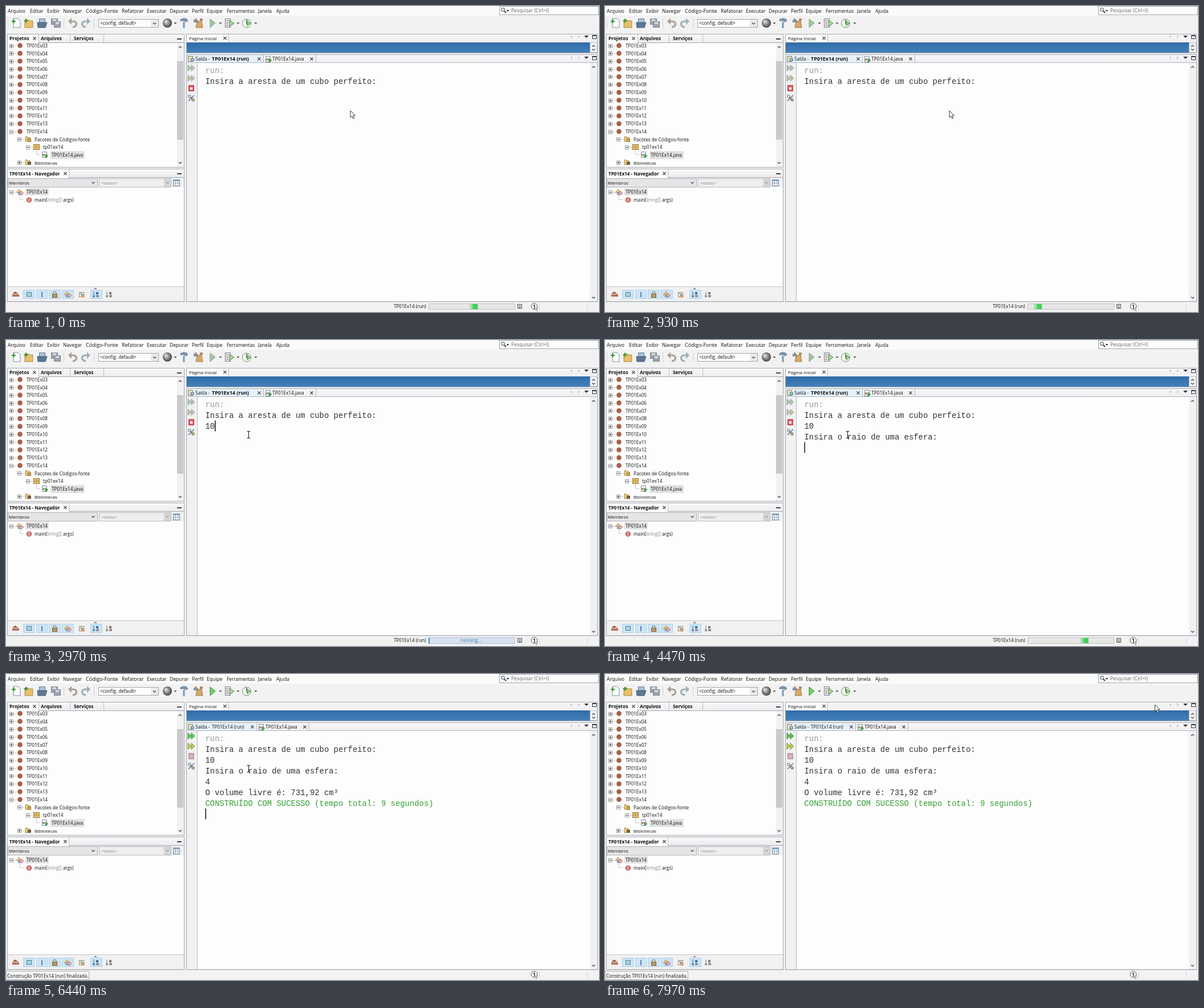
These frames come from a looping animation (1040x538 px, 8100 ms). An HTML page with a canvas:

```html
<!DOCTYPE html>
<html lang="pt">
<head>
<meta charset="utf-8">
<title>Console run</title>
<style>
html, body { margin: 0; width: 100%; height: 100%; overflow: hidden; background: #f2f2f3 }
canvas { display: block }
</style>
</head>
<body>
<canvas id="stage" width="1040" height="538"></canvas>
<script>
const ctx = document.getElementById('stage').getContext('2d');
const LOOP = 8100, DONE = 5430;
const SANS = '"Open Sans", "Noto Sans", sans-serif', MONO = '"Liberation Mono", monospace';
const EDGE = '#a3a8b2', INK = '#111', WHITE = '#fdfdfd', GREY = '#f1f1f2', BACK = '#f2f2f3';

function rect(x, y, w, h, fill, line) {
  if (fill) { ctx.fillStyle = fill; ctx.fillRect(x, y, w, h); }
  if (line) { ctx.strokeStyle = line; ctx.lineWidth = 1; ctx.strokeRect(x + .5, y + .5, w - 1, h - 1); }
}
function shape(d, fill, line, width = 1, x = 0, y = 0) {
  const p = new Path2D(d);
  ctx.save();
  ctx.translate(x, y);
  if (fill) { ctx.fillStyle = fill; ctx.fill(p); }
  if (line) { ctx.strokeStyle = line; ctx.lineWidth = width; ctx.stroke(p); }
  ctx.restore();
}
function disc(x, y, r, fill, line) {
  ctx.beginPath();
  ctx.arc(x, y, r, 0, 7);
  if (fill) { ctx.fillStyle = fill; ctx.fill(); }
  if (line) { ctx.strokeStyle = line; ctx.lineWidth = 1; ctx.stroke(); }
}
function text(s, x, y, size = 8.2, color = INK, bold = '', family = SANS) {
  ctx.font = `${bold} ${size}px ${family}`;
  ctx.fillStyle = color;
  ctx.fillText(s, x, y);
}
function shade(x, y, w, h, top, bottom, line) {
  const g = ctx.createLinearGradient(0, y, 0, y + h);
  g.addColorStop(0, top);
  g.addColorStop(1, bottom);
  rect(x, y, w, h, g, line);
}
const cross = (x, y) => shape('M-2.6 -2.6L2.6 2.6M2.6 -2.6L-2.6 2.6', null, '#333', 1.2, x, y);
const drop = (x, y, c = '#555') => shape('M-2.5 -1H2.5L0 2Z', c, null, 1, x, y);
const chevron = (x, y, up, c = '#444') =>
  shape(up ? 'M-2.5 1.5L0 -1L2.5 1.5' : 'M-2.5 -1.5L0 1L2.5 -1.5', null, c, 1.2, x, y);
const plus = (x, y) => shape('M-3.5 0H3.5M0 -3.5V3.5', null, '#3a9a3a', 2.2, x, y);

function folder(x, y, w, h, color) {
  shape(`M0 2V${h}H${w}V2H${w / 2}L${w / 2 - 2} 0H1Z`, color, '#92763a', .8, x, y);
}
function expander(x, y, open) {
  rect(x - 3, y - 3, 7, 7, WHITE, '#999');
  shape(open ? 'M-1.5 .5H2.5' : 'M-1.5 .5H2.5M.5 -1.5V2.5', null, '#333', 1, x, y);
  rect(x + 5, y, 4, 1, '#c8c8c8');
}
function javaFile(x, y) {
  rect(x, y - 5, 9, 11, '#f5f7fa', '#8792a5');
  disc(x + 3, y + 1, 2, '#b98072');
  shape('M6 -1L11 2.5L6 6Z', '#46ad46', '#267a2b', .6, x, y);
}
function members(x, y) {
  shape('M-6 1L-1 -5L3 0Z', '#f0c878', '#a37a42', .7, x, y);
  rect(x - 3, y, 6, 5, '#9cc0e4', '#5a82aa');
  shape('M3 -2L7 2L3 6L0 2Z', '#eba9a4', '#b46a66', .7, x, y);
}
function windowControls(y) {
  shape('M993 -3L989 0L993 3Z', '#d0d0d0', null, 1, 0, y);
  shape('M1003 -3L1007 0L1003 3Z', '#d0d0d0', null, 1, 0, y);
  shape('M1014 -2H1022L1018 2Z', '#333', null, 1, 0, y);
  rect(1028, y - 3, 8, 7, WHITE, '#333');
  rect(1028, y - 3, 8, 2, '#333');
}

function menuBar() {
  rect(0, 0, 1040, 17, '#fbfbfb');
  [['Arquivo', 3], ['Editar', 42], ['Exibir', 72], ['Navegar', 100], ['Código-Fonte', 140, 9.1],
   ['Refatorar', 203, 8.8], ['Executar', 247], ['Depurar', 287], ['Perfil', 326], ['Equipe', 352],
   ['Ferramentas', 387, 8.3], ['Janela', 442], ['Ajuda', 474]]
    .forEach(([s, x, size = 8.6]) => text(s, x, 12, size));
  rect(865, 0, 175, 16, WHITE, '#9a9fa8');
  shape('M874 9L877 12', null, '#333', 1.8);
  disc(871.5, 6.5, 3, '#dcebf5', '#444');
  drop(880, 8, '#333');
  text('Pesquisar (Ctrl+I)', 886, 11, 8.4, '#666');
}

function toolbar(done) {
  for (let y = 22; y < 40; y += 3) rect(3, y, 1, 1, '#aaa');
  shape('M13 22H21L25 26V38H13Z', WHITE, '#7d8da5');
  plus(13.5, 27);
  folder(33, 24, 14, 14, '#e9bf68');
  plus(35, 26);
  rect(58, 22, 11, 9, '#a9c4dd', '#657b94');
  shape('M55 29H72L69 38H56Z', '#5d7892', '#475c72');
  [[79, 22], [84, 27]].forEach(([x, y]) => {
    rect(x, y, 12, 11, '#9aa2ad', '#7f8792');
    rect(x + 3, y + 1, 6, 4, '#d5d8dd');
  });
  rect(101, 22, 1, 17, '#d0d0d3');
  shape('M112 27H118C126 27 125 37 117 37', null, '#aaa096', 3.2);
  shape('M109 27L115 21V33Z', '#aaa096');
  shape('M145 27H139C131 27 132 37 140 37', null, '#9fb0b6', 3.2);
  shape('M148 27L142 21V33Z', '#9fb0b6');
  rect(154, 22, 1, 17, '#d0d0d3');

  rect(162, 23, 106, 15, WHITE, '#a6a6ac');
  rect(254, 24, 13, 13, '#eaeaec');
  chevron(260.5, 31);
  text('<config. default>', 165, 33, 8.2);
  const ball = ctx.createRadialGradient(280, 27, 1, 283, 30, 9);
  ball.addColorStop(0, '#ddd');
  ball.addColorStop(.5, '#888');
  ball.addColorStop(1, '#333');
  disc(283, 30, 8, ball);
  [297, 376, 407, 438].forEach(x => drop(x, 30));

  shape('M312 28V39', null, '#7399bb', 3);
  shape('M306 24Q311 20 317 23L319 26L315 28L312 26H306Z', '#7f98af', '#566f88', .8);
  shape('M332 22L338 29', null, '#a97a40', 2);
  shape('M335 28L343 26L345 38H333Z', '#d6a866', '#8e6738', .8);
  rect(329, 24, 6, 5, '#7d98b6');
  rect(340, 22, 5, 4, '#b28c61');
  shape('M358 23L367 30L358 38Z', done ? '#72d45f' : '#a2c59e', done ? '#36863a' : '#82a681');
  rect(384, 22, 10, 16, '#ebeef4', '#778293');
  for (let y = 25; y < 36; y += 3) rect(386, y, 4, 1, '#b55');
  shape('M392 25L400 30.5L392 36Z', '#a9d89c', '#438346');
  disc(422, 30.5, 7.5, '#f3f6ee', '#5d9a5f');
  shape('M422 24V31L425 33', null, '#444', 1.2);
  shape('M423 26L429 30.5L423 35Z', '#8ed07f', '#397c3b', .8);
}

function projects() {
  rect(2, 49, 311, 235, GREY, EDGE);
  shade(3, 50, 309, 14, '#f8f8f9', '#ececee');
  rect(3, 50, 54, 15, WHITE);
  [57, 112, 171].forEach(x => rect(x, 50, 1, 14, '#bdbfc5'));
  rect(57, 64, 255, 1, EDGE);
  text('Projetos', 6, 60, 8.4, INK, 'bold');
  cross(50, 57);
  text('Arquivos', 61, 60, 8.4, INK, 'bold');
  text('Serviços', 119, 60, 8.4, INK, 'bold');
  rect(300, 57, 8, 2, '#444');

  rect(3, 65, 297, 218, WHITE);
  ctx.save();
  ctx.beginPath();
  ctx.rect(3, 65, 297, 217);
  ctx.clip();
  for (let i = 0; i < 12; i++) {
    const y = 69.5 + i * 13.73;
    expander(9, Math.round(y), i == 11);
    disc(24.5, y, 4.4, '#a9614e');
    text('TP01Ex' + String(i + 3).padStart(2, 0), 36, y + 3.3);
  }
  expander(23, 234, true);
  folder(34, 229, 8, 9, '#ebc977');
  rect(38, 233, 6, 6, '#d6ad54', '#8f7336');
  text('Pacotes de Códigos-fonte', 50, 237.5);
  expander(38, 248, true);
  rect(48, 243, 11, 10, '#e7c274', '#9b7530');
  shape('M53.5 243V253M48 248H59', null, '#b48c41');
  text('tp01ex14', 65, 251.3);
  shape('M53.5 254V261.5H60', null, '#c8c8c8');
  rect(78, 255, 60, 14, '#e2e2e3');
  javaFile(63, 261);
  text('TP01Ex14.java', 80, 265, 8.3);
  expander(23, 275);
  folder(34, 270, 8, 9, '#ebc977');
  rect(38, 274, 6, 5, '#665b49');
  text('Bibliotecas', 50, 279, 7.9);
  ctx.restore();

  rect(300, 65, 12, 218, GREY);
  rect(300, 97, 11, 138, '#cacacc');
  chevron(305.5, 72, true);
  chevron(305.5, 276);
}

function memberPanel() {
  rect(2, 286, 311, 234, GREY, EDGE);
  shade(3, 287, 309, 14, '#f8f8f9', '#ececee');
  rect(3, 287, 107, 15, WHITE);
  rect(110, 287, 1, 14, '#bdbfc5');
  rect(110, 301, 202, 1, EDGE);
  text('TP01Ex14 - Navegador', 6, 297.5, 8.1, INK, 'bold');
  cross(104, 294.5);
  rect(300, 294, 8, 2, '#444');
  rect(3, 303, 158, 16, '#e5e5e7', '#b4b4b8');
  text('Membros', 5, 314, 8);
  chevron(153, 311);
  rect(163, 303, 127, 16, '#eeeeef', '#bcbcc0');
  rect(277, 304, 12, 14, '#d5d5d8');
  chevron(283, 311, false, '#a0a0a0');
  text('<vazio>', 167, 314, 8, '#888');
  rect(293, 305, 12, 12, WHITE, '#5e7898');
  rect(293, 305, 12, 3, '#7da0c4');
  shape('M297.5 308V317M301.5 308V317M293 311.5H305', null, '#91a4b9');

  rect(3, 319, 309, 175, WHITE);
  rect(3, 493, 309, 1, '#c4c4c8');
  expander(9, 327, true);
  rect(34, 320, 41, 13, '#e2e2e3');
  members(24, 327);
  text('TP01Ex14', 36, 330);
  shape('M24.5 332V340.5H31', null, '#c8c8c8');
  disc(40.5, 341, 4.3, '#d77a76', '#a75653');
  rect(40, 337, 1, 8, '#f0c4c0');
  text('main(', 50, 343.5);
  text('String[]', 70, 343.5, 8.2, '#888');
  text('args)', 100, 343.5);

  shape('M154 498H160L157 495Z', '#888');
  [[30, 20], [53, 20], [75, 21], [98, 21], [148, 21]].forEach(([x, w]) => rect(x, 499, w, 16, '#cce4f5', '#b0d2e9'));
  shape('M11 506L16 502L22 506Z', '#9d5b45');
  [13, 17, 21].forEach(x => disc(x, 509, 2.3, '#b46b55'));
  rect(36, 503, 9, 8, '#a9d2df', '#4c8393');
  rect(62, 503, 2, 9, '#5983ac');
  disc(85.5, 505, 2.7, null, '#76633b');
  rect(81, 506, 9, 7, '#b59c61', '#76633b');
  members(108, 507);
  rect(128, 503, 9, 9, '#f3ecda', '#988a6e');
  disc(135, 510, 3, '#e0a45f');
  shape('M130 504L137 508L132 510Z', '#7ba4b4');
  [[154, '#3b6d9d'], [177, '#777']].forEach(([x, c]) => {
    shape('M0 502V512M-2 509L0 512L2 509', null, c, 1.1, x);
    rect(x + 4, 503, 4, 4, c);
    rect(x + 4, 508, 5, 4, '#9a8d8d');
  });
}

function editor(done) {
  rect(316, 49, 722, 34, GREY, EDGE);
  shade(317, 50, 720, 14, '#f8f8f9', '#eeeef0');
  rect(317, 50, 73, 14, WHITE);
  rect(390, 50, 1, 14, '#bdbfc5');
  text('Página Inicial', 321, 60, 8);
  cross(384, 56.5);
  windowControls(54);
  shade(317, 64, 707, 18, '#316ca8', '#4380ba');
  rect(1024, 64, 13, 18, '#f4f4f5', '#c5c5c8');
  chevron(1030.5, 70, true);
  chevron(1030.5, 77);

  rect(316, 85, 722, 435, GREY, EDGE);
  shade(317, 86, 720, 14, '#f8f8f9', '#eeeef0');
  const tab = done ? 439 : 451;
  rect(317, 86, tab - 317, 14, '#e6f1fa');
  [tab, tab + 92].forEach(x => rect(x, 86, 1, 14, '#b1b5bd'));
  rect(317, 99, 720, 1, '#aab6c6');
  rect(319, 88, 9, 10, '#e6dfba', '#89835e');
  rect(324, 92, 6, 5, '#a9c6e0', '#567c9e');
  text('Saída - ', 332, 96);
  text('TP01Ex14 (run)', 361, 96, done ? 8.1 : 8.9, INK, done ? '' : 'bold');
  cross(tab - 7, 93);
  javaFile(tab + 4, 93);
  text('TP01Ex14.java', tab + 16, 96, 8.4);
  cross(tab + 85, 93);
  windowControls(91);

  rect(335, 100, 1, 419, '#b5b8c0');
  rect(336, 100, 688, 419, WHITE);
  rect(1024, 100, 13, 419, '#f1f1f2');
  chevron(1030.5, 107, true);
  chevron(1030.5, 513);
  [109, 127].forEach((y, i) => {
    const fill = done ? ['#62c95a', '#c1cf57'][i] : ['#b3c5b0', '#c0c4a8'][i];
    const line = done ? ['#318536', '#7d8b32'][i] : '#96a695';
    shape('M0 -5.5L6 0L0 5.5ZM6 -5.5L12 0L6 5.5Z', fill, line, .9, 319, y);
  });
  rect(320, 139, 10, 11, done ? '#c9a4ab' : '#e45f69', done ? '#b8959b' : '#b5414b');
  rect(323, 143, 4, 4, done ? '#dac1c5' : '#fff');
  shape('M320 157L330 167M330 157L320 167', null, '#647b92', 1.7);
  disc(322, 159, 2.3, '#f2f2f2', '#566');
  disc(328, 165, 2.3, '#d6b777', '#665');
}

function output(t) {
  const line = (row, s, color = '#333') => text(s, 349.5, 118 + 19 * row, 13.9, color, '', MONO);
  line(0, 'run:', '#999');
  line(1, 'Insira a aresta de um cubo perfeito:');
  if (t >= 2530) line(2, t < 2630 ? '1' : '10');
  if (t >= 3370) line(3, 'Insira o raio de uma esfera:');
  if (t >= 5200) line(4, '4');
  if (t >= DONE) {
    line(5, 'O volume livre é: 731,92 cm³');
    line(6, 'CONSTRUÍDO COM SUCESSO (tempo total: 9 segundos)', '#38a038');
  }
  // Each entry restarts the blink: time, row, column
  const [start, row, col] = [[130, 2, 0], [2530, 2, 1], [2630, 2, 2], [3330, 3, 0], [3370, 4, 0],
    [5200, 4, 1], [5400, 5, 0], [DONE, 7, 0]].filter(c => c[0] <= t).pop() || [];
  if (start !== undefined && Math.floor((t - start) / 503) % 2 == 0)
    rect(349.5 + col * 8.34, 103.5 + 19 * row, 1.5, 19, '#111');
}

function statusBar(t) {
  rect(0, 521, 1040, 17, BACK);
  rect(0, 520, 1040, 1, '#dedee2');
  [935, 1019].forEach(x => rect(x, 524, 1, 11, '#d4d4d7'));
  disc(926.5, 528, 5.3, WHITE, '#555');
  shape('M926 532L931 536V531Z', WHITE, '#555', .8);
  text('1', 924, 531.3, 8.6, '#111', 'bold');
  if (t >= DONE) {
    rect(0, 522, 146, 16, '#f4f4f5', '#b1b1b6');
    text('Construção TP01Ex14 (run) finalizada.', 2, 533.5, 8.1);
    return;
  }
  text('TP01Ex14 (run)', 680, 531, 8.1);
  rect(897, 524, 8, 8, '#eee', '#555');
  shape('M899 526.5H903M899 528.5H903M899 530.5H903', null, '#555', .8);
  if (t >= 2950 && t < 3530) {
    rect(741, 523, 152, 11, '#d5e3f1', '#b1bdca');
    rect(741, 523, 2, 11, '#4686c5');
    text('running...', 797, 531, 8.4, '#4178ad');
    return;
  }
  rect(741, 523, 152, 11, '#e7e7e8', '#c3c3c6');
  const step = t < 3530 ? 14 + Math.floor(t / 52) : Math.floor((t - 3530) / 52);
  const x = 742 + step % 29 * 5.1;
  const w = Math.min(14, 892 - x);
  rect(x, 524, w, 9, '#a2e2a9');
  rect(x + 5, 524, Math.max(0, Math.min(9, 887 - x)), 9, '#45cf5c');
}

const ease = p => (p = Math.max(0, Math.min(1, p)), p * p * (3 - 2 * p));
function pointer(t) {
  const a = ease((t - 950) / 600), b = ease((t - 7170) / 770);
  const x = 604 + (425.5 - 604) * a + (964.5 - 425.5) * b;
  const y = 184 + (166.5 - 184) * a + (54 - 166.5) * b;
  if (a > 0 && y > 100)
    shape('M-3 -6H-1L0 -5L1 -6H3M0 -5V5M-3 6H-1L0 5L1 6H3', null, '#222', 1.1, x, y);
  else
    shape('M0 0V12L2.8 9.4L4.7 14L6.8 13L4.8 8.7H8.5Z', WHITE, '#222', .9, x, y);
}

function draw(now) {
  const t = now % LOOP, done = t >= DONE;
  rect(0, 0, 1040, 538, BACK);
  menuBar();
  toolbar(done);
  projects();
  memberPanel();
  editor(done);
  output(t);
  statusBar(t);
  pointer(t);
}
const begin = performance.now();
function tick() {
  draw(performance.now() - begin);
  requestAnimationFrame(tick);
}
tick();
</script>
</body>
</html>
```
